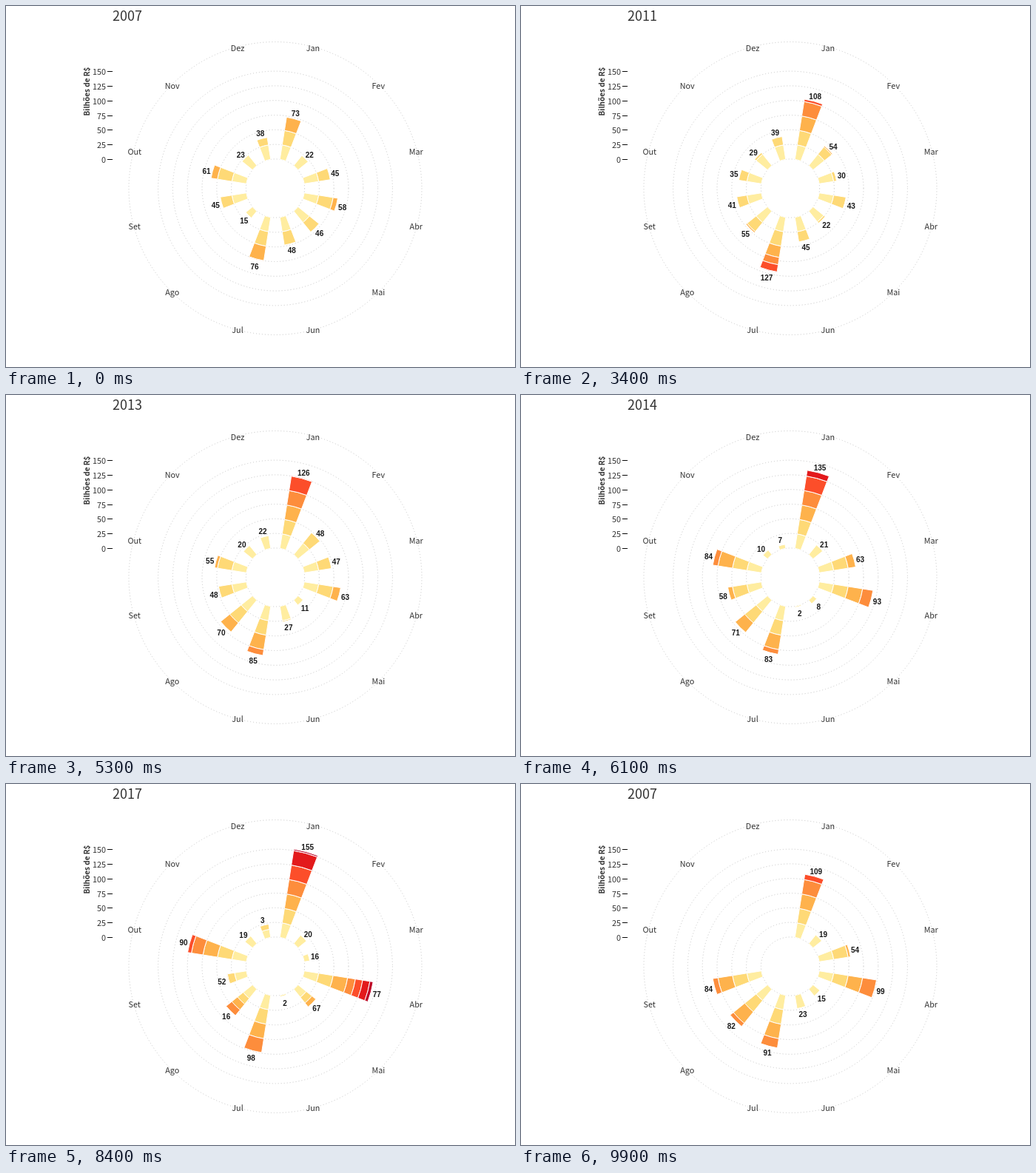
Write an HTML page with a canvas that moves like this. It is 688x488 px and loops after 10000 ms.

```html
<!DOCTYPE html>
<html lang="pt">
<head>
<meta charset="utf-8">
<title>Bilhões de R$ por mês</title>
<style>
  html, body { margin: 0; width: 100%; height: 100%; overflow: hidden; background: #fff; }
  canvas { display: block; width: 688px; height: 488px; }
</style>
</head>
<body>
<canvas id="stage" width="688" height="488"></canvas>
<script>
const ctx = document.getElementById('stage').getContext('2d');
const CX = 364, CY = 246.5, INNER = 39.6, UNIT = 0.792, BAND = 25;
const LOOP = 10000, TWEEN = 100, RAD = Math.PI / 180;
const HALF_WIDTH = 6 * RAD;
const SANS = '"Noto Sans CJK JP", "Noto Sans CJK SC", "Noto Sans CJK", "Noto Sans", sans-serif';
const ARIAL = '"Liberation Sans", Arial, sans-serif';
const MONTHS = 'Jan Fev Mar Abr Mai Jun Jul Ago Set Out Nov Dez'.split(' ');
const COLORS = ['#ffeda0', '#fed976', '#feb24c', '#fd8d3c', '#fc4e2a', '#e31a1c', '#bd0026'];
const FIRST_YEAR = 2007;

// One row per year, one value per month.
const DATA = [
  [73, 22, 45, 58, 46, 48, 76, 15, 45, 61, 23, 38],
  [68, 24, 39, 75, 17, 31, 92, 12, 28, 26, 11, 34],
  [94, 10, 28, 39, 39, 34, 50, 26, 47, 51, 27, 42],
  [100, 32, 30, 51, 31, 40, 64, 40, 44, 43, 28, 40],
  [108, 54, 30, 43, 22, 45, 127, 55, 41, 35, 29, 39],
  [117, 76, 31, 29, 14, 51, 146, 69, 38, 26, 30, 37],
  [126, 48, 47, 63, 11, 27, 85, 70, 48, 55, 20, 22],
  [135, 21, 63, 93, 8, 2, 83, 71, 58, 84, 10, 7],
  [123, 19, 76, 112, 75, 3, 75, 22, 59, 149, 10, 5],
  [150, 17, 3, 161, 11, 3, 100, 100, 16, 113, 14, 43],
  [155, 20, 16, 77, 67, 2, 98, 16, 52, 90, 19, 3],
  [109, 19, 54, 99, 15, 23, 91, 82, 84]
];
const STARTS = [0, 700, 1600, 2500, 3400, 4300, 5200, 6000, 6800, 7600, 8400, 9200];
const RESET = 9800;

const radius = v => INNER + v * UNIT;
const band = (v, k) => Math.max(0, Math.min(BAND, v - k * BAND));
const angleOf = m => (m * 30 - 75) * RAD;

function text(str, x, y, font, color, align = 'center') {
  ctx.font = font;
  ctx.fillStyle = color;
  ctx.textAlign = align;
  ctx.fillText(str, x, y);
}

function drawGrid() {
  ctx.lineWidth = 1;
  ctx.strokeStyle = '#c4c4c4';
  ctx.setLineDash([1, 3]);
  for (const v of [0, 25, 50, 75, 100, 125, 150, 200]) {
    ctx.beginPath();
    ctx.arc(CX, CY, radius(v), 0, 2 * Math.PI);
    ctx.stroke();
  }
  ctx.setLineDash([]);
}

function drawAxis() {
  for (let v = 0; v <= 150; v += BAND) {
    const y = Math.round(CY - radius(v));
    ctx.fillStyle = '#000';
    ctx.fillRect(137, y, 7, 1);
    text(v, 135, y + 5, '10.8px ' + SANS, '#333', 'right');
  }
  ctx.save();
  ctx.translate(113, 115.5);
  ctx.rotate(-Math.PI / 2);
  text('Bilhões de R$', 0, 0, 'bold 10px ' + SANS, '#333');
  ctx.restore();
  MONTHS.forEach((name, m) => {
    const a = angleOf(m);
    text(name, CX + 197 * Math.cos(a), CY + 197 * Math.sin(a) + 5, '10.8px ' + SANS, '#333');
  });
}

function drawSegment(a, r0, r1, color) {
  ctx.beginPath();
  ctx.arc(CX, CY, r0, a - HALF_WIDTH, a + HALF_WIDTH);
  ctx.arc(CX, CY, r1, a + HALF_WIDTH, a - HALF_WIDTH, true);
  ctx.closePath();
  ctx.fillStyle = color;
  ctx.fill();
  ctx.strokeStyle = '#fff';
  ctx.stroke();
}

function drawBar(m, from, to, t) {
  const a = angleOf(m);
  let total = 0;
  COLORS.forEach((color, k) => {
    const size = band(from, k) * (1 - t) + band(to, k) * t;
    if (size > 0.01) drawSegment(a, radius(total), radius(total + size), color);
    total += size;
  });
  return radius(total) + 8.3;
}

function drawBars(year, t) {
  const now = DATA[year], before = DATA[Math.max(0, year - 1)];
  const labels = [];
  for (let m = 0; m < 12; m++) {
    // A month without a new value keeps its old bar until the change is over.
    if (now[m] === undefined && t === 1) continue;
    const value = now[m] ?? before[m];
    labels.push([m, value, drawBar(m, before[m] ?? value, value, t)]);
  }
  for (const [m, value, r] of labels) {
    const a = angleOf(m);
    text(value, CX + r * Math.cos(a), CY + r * Math.sin(a) + 5, 'bold 10px ' + ARIAL, '#1a1a1a');
  }
}

function draw(year, t, title) {
  ctx.fillStyle = '#fff';
  ctx.fillRect(0, 0, 688, 488);
  drawGrid();
  drawAxis();
  drawBars(year, t);
  text(title, 144, 20, '18px ' + SANS, '#333', 'left');
}

function frame() {
  const time = performance.now() % LOOP;
  let year = STARTS.length - 1;
  while (STARTS[year] > time) year--;
  const t = year > 0 && time - STARTS[year] < TWEEN ? 0.5 : 1;
  draw(year, t, FIRST_YEAR + (time >= RESET ? 0 : year));
  requestAnimationFrame(frame);
}
frame();
</script>
</body>
</html>
```
